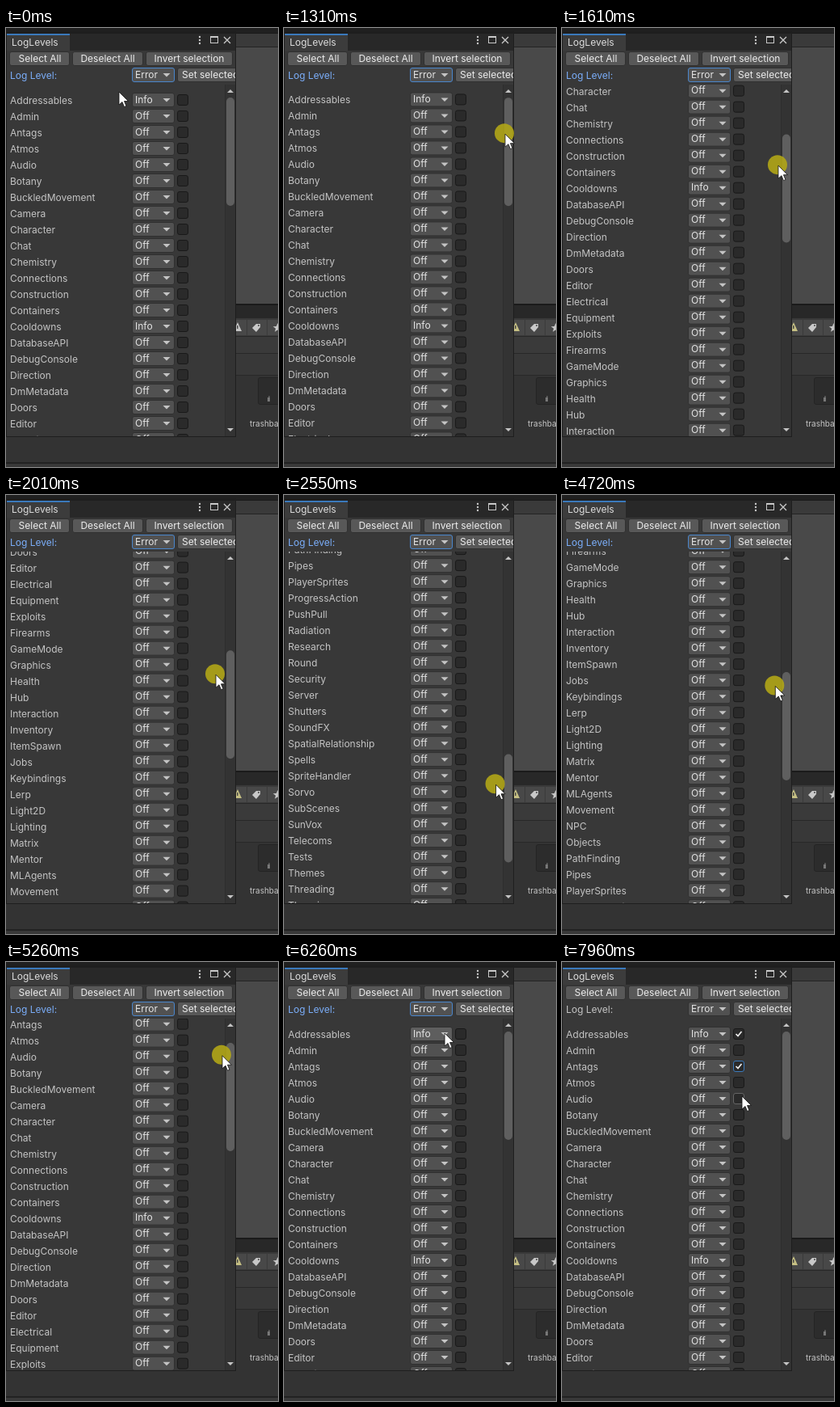
These frames come from a looping animation (337x543 px, 8000 ms). An HTML page with a canvas:

```html
<!DOCTYPE html>
<html>
<head>
<meta charset="utf-8">
<style>
html, body { margin: 0; width: 100%; height: 100%; overflow: hidden; background: #333; }
canvas { display: block; }
</style>
</head>
<body>
<canvas id="stage" width="337" height="543"></canvas>
<script>
const g = document.getElementById('stage').getContext('2d');
const LOOP = 8000, ROW = 20, TRAVEL = 270, MAX_SCROLL = 1015;

const categories = ('Addressables Admin Antags Atmos Audio Botany BuckledMovement Camera Character Chat Chemistry ' +
  'Connections Construction Containers Cooldowns DatabaseAPI DebugConsole Direction DmMetadata Doors Editor ' +
  'Electrical Equipment Exploits Firearms GameMode Graphics Health Hub Interaction Inventory ItemSpawn Jobs ' +
  'Keybindings Lerp Light2D Lighting Matrix Mentor MLAgents Movement NPC Objects PathFinding Pipes PlayerSprites ' +
  'ProgressAction PushPull Radiation Research Round Security Server Shutters SoundFX SpatialRelationship Spells ' +
  'SpriteHandler Sorvo SubScenes SunVox Telecoms Tests Themes Threading Throwing TileMaps Transform UI UIAction ' +
  'Unknown VariableViewer').split(' ');

// time, x, y
const pointerPath = [
  [0, 140, 79], [60, 140, 79], [230, 271, 102], [360, 271, 102], [1150, 274, 116], [1310, 274, 131],
  [2010, 260, 222], [2860, 264, 436], [3080, 265, 445], [3690, 265, 445], [3940, 259, 411],
  [5260, 268, 116], [5600, 262, 36], [5800, 262, 36], [6180, 204, 66], [6260, 199, 88],
  [6570, 216, 90], [7000, 216, 91], [7260, 216, 134], [7540, 216, 134], [7760, 235, 152], [7960, 223, 166]
];
// time, thumb offset
const thumbPath = [[1310, 0], [2010, 106], [2700, TRAVEL], [4100, TRAVEL], [5260, 14], [5430, 0]];
const presses = [[1000, 5650], [6720, 6870], [7260, 7400]];

function follow(path, t) {
  const n = path.findIndex(p => p[0] > t);
  if (n === 0) return path[0].slice(1);
  if (n < 0) return path[path.length - 1].slice(1);
  const a = path[n - 1], b = path[n], k = (t - a[0]) / (b[0] - a[0]);
  return a.slice(1).map((v, i) => v + (b[i + 1] - v) * k);
}

function rect(x, y, w, h, color) {
  g.fillStyle = color;
  g.fillRect(x, y, w, h);
}

function poly(color, ...pts) {
  g.beginPath();
  for (let i = 0; i < pts.length; i += 2) g.lineTo(pts[i], pts[i + 1]);
  g.closePath();
  g.fillStyle = color;
  g.fill();
}

function text(s, x, y, color = '#c4c4c4', align = 'left', size = 12) {
  g.font = size + 'px Inter, "Open Sans", sans-serif';
  g.textAlign = align;
  g.fillStyle = color;
  g.fillText(s, x, y);
}

function box(x, y, w, h, fill, border) {
  g.beginPath();
  g.roundRect(x + .5, y + .5, w - 1, h - 1, 2.5);
  g.fillStyle = fill;
  g.fill();
  g.strokeStyle = border;
  g.lineWidth = 1;
  g.stroke();
}

function circle(x, y, r, color) {
  g.beginPath();
  g.arc(x, y, r, 0, 7);
  g.fillStyle = color;
  g.fill();
}

function button(label, x, y, w, tx, align) {
  box(x, y, w, 18, '#585858', '#303030');
  text(label, tx, y + 13, '#eee', align);
}

function dropdown(label, y, hover, focus) {
  box(156, y, 53, 18, hover ? '#5e5e5e' : '#515151', focus ? '#4a86cc' : '#303030');
  text(label, 160, y + 12.5, '#e4e4e4');
  poly('#c4c4c4', 194.5, y + 7, 203.5, y + 7, 199, y + 11.5);
}

function checkbox(y, checked, hover, focus) {
  box(212, y, 14, 14, '#2a2a2a', focus ? '#3a79bb' : hover ? '#656565' : '#191919');
  if (!checked) return;
  g.beginPath();
  g.moveTo(215.5, y + 7);
  g.lineTo(218, y + 9.5);
  g.lineTo(222.5, y + 4);
  g.strokeStyle = '#eee';
  g.lineWidth = 1.7;
  g.stroke();
}

function backdrop(t) {
  rect(0, 0, 337, 543, '#333');
  rect(0, 0, 337, 7, '#202020');
  rect(285, 7, 52, 16, '#3a3a3a');
  rect(285, 6, 52, 1, '#191919');
  rect(285, 23, 52, 1, '#232323');
  rect(285, 24, 52, 317, '#494949');
  rect(285, 341, 52, 18, '#282828');
  rect(285, 341, 52, 2, '#1b1b1b');
  rect(285, 359, 52, 44, '#3a3a3a');
  rect(285, 403, 52, 27, '#383838');
  for (const y of [381, 402, 429]) rect(285, y, 52, 1, '#282828');
  for (const [x, w] of [[280, 18], [299, 24], [324, 20]]) rect(x, 361, w, 19, '#484848');
  poly(t < 380 ? '#c4c4c4' : '#c5bf83', 287, 364, 292, 375, 282, 375);
  rect(286, 368, 1.5, 4, '#484848');
  poly('#c8c8c8', 305, 371, 310, 366, 315, 366, 315, 370, 310, 376);
  circle(313, 368, 1, '#484848');
  const star = [];
  for (let i = 0; i < 10; i++) {
    const r = i % 2 ? 2.5 : 6, a = i * Math.PI / 5;
    star.push(336.5 + r * Math.sin(a), 371 - r * Math.cos(a));
  }
  poly('#c8c8c8', ...star);
  box(312, 432, 30, 34, '#2c2c2c', '#242424');
  rect(324, 457, 3, 5, '#777');
  rect(325, 455, 2, 2, '#555');
  text('trashbag', 302, 493, '#c4c4c4', 'left', 10);
  rect(0, 537, 337, 2, '#222');
  rect(0, 539, 337, 4, '#383838');
}

function list(t, px, py, scroll) {
  g.save();
  g.beginPath();
  g.rect(0, 70, 284, 435);
  g.clip();
  categories.forEach((name, i) => {
    const y = 80 + i * ROW - scroll;
    if (y < 50 || y > 505) return;
    const hover = py >= y && py < y + 18 && t > 5650;
    text(name, 5, y + 14);
    dropdown(name === 'Addressables' || name === 'Cooldowns' ? 'Info' : 'Off', y, hover && px > 156 && px < 209);
    const checked = i === 0 && t >= 6870 || i === 2 && t >= 7400;
    const focus = i === 0 && t >= 6720 && t < 7260 || i === 2 && t >= 7260;
    checkbox(y + 2, checked, hover && px > 211 && px < 227, focus);
  });
  g.restore();
}

function panel(t, px, py) {
  const [thumb] = follow(thumbPath, t), focus = t < 6720;
  rect(0, 4, 285, 502, '#1e1e1e');
  rect(1, 7, 283, 21, '#282828');
  rect(1, 28, 283, 477, '#383838');
  rect(1, 7, 78, 21, '#3c3c3c');
  rect(1, 7, 78, 2, '#3a79bb');
  text('LogLevels', 7, 22, '#dcdcdc');
  for (const y of [11, 15, 19]) circle(240, y, 1.2, '#c8c8c8');
  g.strokeStyle = '#c8c8c8';
  g.lineWidth = 1;
  g.strokeRect(253.5, 10.5, 9, 8);
  rect(253, 10, 10, 2, '#c8c8c8');
  g.beginPath();
  g.moveTo(270, 11); g.lineTo(278, 19);
  g.moveTo(278, 11); g.lineTo(270, 19);
  g.lineWidth = 1.3;
  g.stroke();

  button('Select All', 4, 29, 75, 42, 'center');
  button('Deselect All', 82, 29, 88, 126, 'center');
  button('Invert selection', 173, 29, 108, 227, 'center');
  text('Log Level:', 5, 63, focus ? '#7baefa' : '#c4c4c4');
  dropdown('Error', 49, false, focus);
  g.save();
  g.beginPath();
  g.rect(0, 40, 284, 40);
  g.clip();
  button('Set selected', 212, 49, 90, 218, 'left');
  g.restore();

  list(t, px, py, thumb * MAX_SCROLL / TRAVEL);
  rect(271, 70, 13, 435, '#333');
  rect(271, 70, 1, 435, '#2d2d2d');
  poly('#c4c4c4', 274, 80, 282, 80, 278, 76);
  poly('#c4c4c4', 274, 495, 282, 495, 278, 499);
  g.beginPath();
  g.roundRect(273, 86 + thumb, 10, 134, 5);
  g.fillStyle = '#5f5f5f';
  g.fill();
}

function pointer(t, x, y) {
  if (presses.some(([a, b]) => t >= a && t < b)) circle(x - 1, y - 1, 12, 'rgba(180,168,22,.88)');
  g.save();
  g.translate(x, y);
  poly('#fff', 0, 0, 0, 16, 4, 12.5, 6.5, 18.5, 9, 17.5, 6.5, 11.5, 11.5, 11.5);
  g.strokeStyle = '#111';
  g.lineWidth = .8;
  g.stroke();
  g.restore();
}

function draw(now) {
  const t = now % LOOP, [x, y] = follow(pointerPath, t);
  backdrop(t);
  panel(t, x, y);
  pointer(t, x, y);
  requestAnimationFrame(draw);
}
requestAnimationFrame(draw);
</script>
</body>
</html>
```
